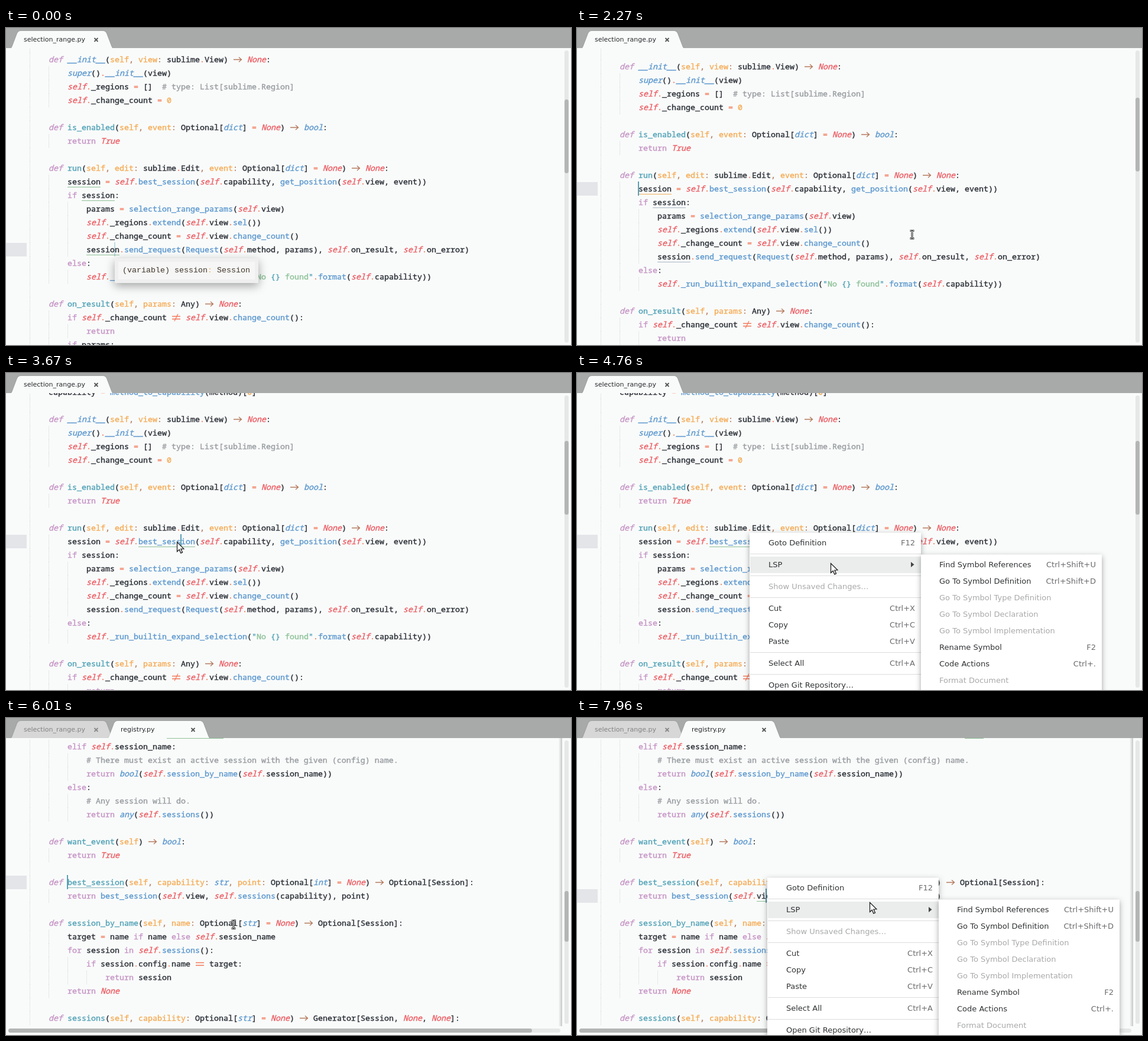
These frames come from a looping animation (956 by 537 pixels, 8000 ms). An HTML page with a canvas:

```html
<!DOCTYPE html>
<html lang="en">
<head>
<meta charset="utf-8">
<title>Go to definition</title>
<style>
html, body { margin: 0; width: 100%; height: 100%; overflow: hidden; background: #f9fbfa; }
canvas { display: block; }
</style>
</head>
<body>
<canvas id="stage" width="956" height="537"></canvas>
<script>
const g = document.getElementById('stage').getContext('2d');
const LOOP = 8000, LINE = 23, COL = 8, LEFT = 40;
const MONO = '13.333px "Noto Sans Mono", "DejaVu Sans Mono", monospace';
const SANS = '"DejaVu Sans", sans-serif';
const C = {
  bg: '#f9fbfa', text: '#2d3138', purple: '#c695c6', red: '#ec5f66', blue: '#5f99cf', teal: '#54a3b8',
  green: '#8fc29a', orange: '#f5ac58', op: '#f4775a', comment: '#999da1', arrow: '#b57a5e', caret: '#5a9fb4',
  mark: '#8fc097'
};

const rangeFile = `    capability = method_to_capability(method)[0]

    def __init__(self, view: sublime.View) -> None:
        super().__init__(view)
        self._regions = []  # type: List[sublime.Region]
        self._change_count = 0

    def is_enabled(self, event: Optional[dict] = None) -> bool:
        return True

    def run(self, edit: sublime.Edit, event: Optional[dict] = None) -> None:
        session = self.best_session(self.capability, get_position(self.view, event))
        if session:
            params = selection_range_params(self.view)
            self._regions.extend(self.view.sel())
            self._change_count = self.view.change_count()
            session.send_request(Request(self.method, params), self.on_result, self.on_error)
        else:
            self._run_builtin_expand_selection("No {} found".format(self.capability))

    def on_result(self, params: Any) -> None:
        if self._change_count != self.view.change_count():
            return
        if params:`.split('\n');

const registryFile = `        elif self.session_name:
            # There must exist an active session with the given (config) name.
            return bool(self.session_by_name(self.session_name))
        else:
            # Any session will do.
            return any(self.sessions())

    def want_event(self) -> bool:
        return True

    def best_session(self, capability: str, point: Optional[int] = None) -> Optional[Session]:
        return best_session(self.view, self.sessions(capability), point)

    def session_by_name(self, name: Optional[str] = None) -> Optional[Session]:
        target = name if name else self.session_name
        for session in self.sessions():
            if session.config.name == target:
                return session
        return None

    def sessions(self, capability: Optional[str] = None) -> Generator[Session, None, None]:`.split('\n');

// y, label, shortcut, disabled
const mainItems = [
  [287, 'Goto Definition', 'F12'], [324, 'LSP', ''], [361, 'Show Unsaved Changes…', '', 1],
  [398, 'Cut', 'Ctrl+X'], [426, 'Copy', 'Ctrl+C'], [454, 'Paste', 'Ctrl+V'],
  [491, 'Select All', 'Ctrl+A'], [528, 'Open Git Repository…', '']
];
const subItems = [
  ['Find Symbol References', 'Ctrl+Shift+U'], ['Go To Symbol Definition', 'Ctrl+Shift+D'],
  ['Go To Symbol Type Definition', '', 1], ['Go To Symbol Declaration', '', 1],
  ['Go To Symbol Implementation', '', 1], ['Rename Symbol', 'F2'],
  ['Code Actions', 'Ctrl+.'], ['Format Document', '', 1]
].map((item, i) => [324 + 28 * i, ...item]);

const ramp = (t, a, b) => Math.max(0, Math.min(1, (t - a) / (b - a)));
const ease = p => p * p * (3 - 2 * p);

function rect(x, y, w, h, color, r = 0) {
  g.fillStyle = color;
  g.beginPath();
  g.roundRect(x, y, w, h, r);
  g.fill();
}

function text(s, x, y, color, font, align = 'left') {
  g.font = font;
  g.fillStyle = color;
  g.textAlign = align;
  g.fillText(s, x, y);
}

// Code glyphs get a thin outline for a medium weight
function codeText(s, x, y, color, italic) {
  text(s, x, y, color, (italic ? 'italic ' : '') + MONO);
  g.strokeStyle = color;
  g.lineWidth = .4;
  g.strokeText(s, x, y);
}

function lines(color, width, ...paths) {
  g.strokeStyle = color;
  g.lineWidth = width;
  g.beginPath();
  for (const p of paths) p.forEach(([x, y], i) => i ? g.lineTo(x, y) : g.moveTo(x, y));
  g.stroke();
}

// Returns [colour, italic] for one token
function style(tok, line, at) {
  const arrow = line.indexOf('->');
  const isDef = /^\s*def /.test(line);
  const inParams = isDef && at < (arrow < 0 ? line.length : arrow);
  const next = line[at + tok.length];
  if (tok[0] === '#') return [C.comment];
  if (tok === 'def') return [C.purple, 1];
  if (/^(if|elif|else|return|for|in)$/.test(tok)) return [C.purple];
  if (tok === 'self') return inParams ? [C.orange] : [C.red, 1];
  if (/^(None|True)$/.test(tok)) return [C.red, 1];
  if (/^(dict|bool|str|int|any|super|__init__)$/.test(tok)) return [C.blue, 1];
  if (/^\d/.test(tok)) return [C.orange];
  if (/^\w/.test(tok)) {
    if (next === '(') return [isDef ? C.teal : C.blue];
    return [inParams && next === ':' ? C.orange : C.text];
  }
  if (tok === '=' || tok === '.') return [C.op];
  if (inParams && /[,:]/.test(tok)) return [C.arrow];
  return [C.text];
}

function ligature(tok, x, y) {
  if (tok === '->') lines(C.arrow, 1.3, [[x + 1, y], [x + 15, y]], [[x + 10, y - 4], [x + 14.5, y], [x + 10, y + 4]]);
  else {
    lines(C.op, 1.3, [[x + 1, y - 2], [x + 15, y - 2]], [[x + 1, y + 2.5], [x + 15, y + 2.5]]);
    if (tok === '!=') lines(C.op, 1.3, [[x + 5, y + 6], [x + 11, y - 6]]);
  }
}

function codeLine(line, y) {
  for (const m of line.matchAll(/#.*|"[^"]*"|->|!=|==|\w+|\s+|./g)) {
    const tok = m[0];
    let x = LEFT + m.index * COL;
    if (/^\s/.test(tok)) continue;
    if (/^(->|!=|==)$/.test(tok)) ligature(tok, x, y + .5);
    else if (tok[0] === '"') {
      for (const part of tok.split(/("|{})/)) {
        codeText(part, x, y + 5, /["{]/.test(part) ? C.teal : C.green);
        x += part.length * COL;
      }
    } else codeText(tok, x, y + 5, ...style(tok, line, m.index));
  }
}

function code(file, top) {
  file.forEach((line, i) => {
    const y = top + i * LINE;
    if (y > 560) return;
    const indent = line.search(/\S/);
    g.setLineDash([1, 1]);
    for (let c = 0; c < Math.max(indent, 1); c += 4)
      lines('#d3d7d6', 1, [[LEFT + c * COL + .5, y - 11], [LEFT + c * COL + .5, y + 12]]);
    g.setLineDash([]);
    codeLine(line, y);
  });
}

const underline = (x, y, chars, color) => rect(x, y + 9, chars * COL, 1, color);
const gutter = y => rect(0, y - 11, 35, LINE, '#e3e5e9');

function caret(x, y, alpha = 1) {
  g.globalAlpha = alpha;
  rect(x - 1, y - 12, 2, 24, C.caret);
  g.globalAlpha = 1;
}

function tab(x, label, active) {
  g.save();
  g.shadowColor = 'rgba(0,0,0,.15)';
  g.shadowBlur = 2;
  g.fillStyle = active ? C.bg : '#d6d7d6';
  g.beginPath();
  g.moveTo(x, 35);
  g.quadraticCurveTo(x + 2, 33, x + 3, 30);
  g.lineTo(x + 11, 9);
  g.quadraticCurveTo(x + 13, 5, x + 17, 5);
  g.lineTo(x + 156, 5);
  g.quadraticCurveTo(x + 160, 5, x + 162, 9);
  g.lineTo(x + 170, 30);
  g.quadraticCurveTo(x + 171, 33, x + 173, 35);
  g.fill();
  g.restore();
  text(label, x + 22, 23, active ? '#26292c' : '#858083', '11px ' + SANS);
  const cx = x + 144.5, r = 3;
  lines(active ? '#555' : '#888', 1.8, [[cx - r, 20 - r], [cx + r, 20 + r]], [[cx + r, 20 - r], [cx - r, 20 + r]]);
}

function panel(x, y, w, h) {
  g.save();
  g.shadowColor = 'rgba(0,0,0,.35)';
  g.shadowBlur = 9;
  g.shadowOffsetY = 2;
  rect(x, y, w, h, '#fff');
  g.restore();
}

function items(list, x, right) {
  for (const [y, label, keys, off] of list) {
    text(label, x, y + 5, off ? '#a8a9a9' : '#303234', '13px ' + SANS);
    text(keys, right, y + 5, '#6c6a6e', '13px ' + SANS, 'right');
  }
}

function menu(x, alpha, hover, subAlpha, subHover) {
  if (!alpha) return;
  g.globalAlpha = alpha;
  panel(x, 270.5, 290, 300);
  if (hover) rect(x + 1, hover - 13, 289, 28, '#ebecec');
  for (const y of [306, 343, 380, 473, 510]) rect(x + 1, y, 289, 1, '#dcdddd');
  items(mainItems, x + 32, x + 280);
  g.fillStyle = '#444';
  g.beginPath();
  g.moveTo(x + 273, 320);
  g.lineTo(x + 278.5, 324.5);
  g.lineTo(x + 273, 329);
  g.fill();
  g.globalAlpha = subAlpha;
  if (subAlpha) {
    panel(x + 290, 307.5, 306, 300);
    if (subHover) rect(x + 291, subHover - 13, 305, 28, '#ebecec');
    items(subItems, x + 321, x + 586);
  }
  g.globalAlpha = 1;
}

function hoverPopup() {
  g.save();
  g.shadowColor = 'rgba(0,0,0,.35)';
  g.shadowBlur = 16;
  g.shadowOffsetY = 5;
  rect(184, 390, 243, 42, '#eeefee');
  g.restore();
  rect(190, 396, 231, 30, '#f5f6f5');
  const font = '13.333px "Liberation Mono", monospace';
  text('(variable) session', 197, 414, '#40342a', font);
  text(':', 341, 414, C.orange, font);
  text('Session', 357, 414, '#40342a', font);
}

function pointer(x, y) {
  g.beginPath();
  [[0, 0], [0, 16], [3.7, 12.6], [6.3, 18.6], [9, 17.4], [6.4, 11.6], [11.3, 11.3]]
    .forEach(([dx, dy]) => g.lineTo(x + dx + .5, y + dy + .5));
  g.closePath();
  g.fillStyle = '#fff';
  g.fill();
  g.strokeStyle = '#1c1c1c';
  g.lineWidth = 1.3;
  g.stroke();
}

function beam(x, y) {
  const shape = [
    [[x - 3.5, y - 6.5], [x - 1, y - 6.5], [x, y - 5.5], [x + 1, y - 6.5], [x + 3.5, y - 6.5]],
    [[x, y - 5.5], [x, y + 5.5]],
    [[x - 3.5, y + 6.5], [x - 1, y + 6.5], [x, y + 5.5], [x + 1, y + 6.5], [x + 3.5, y + 6.5]]
  ];
  lines('#222', 3, ...shape);
  lines('#fff', 1, ...shape);
}

// time, x, y
const mousePath = [
  [2170, 567, 350], [2670, 567, 350], [3280, 291, 287], [3710, 289, 286], [4060, 345, 310], [4220, 345, 310],
  [4480, 429, 322], [4760, 429, 322], [5000, 606, 331], [5170, 606, 331], [5290, 640, 348],
  [5640, 640, 350], [6010, 385, 350], [6060, 385, 350], [6290, 345, 319], [6330, 345, 319],
  [6700, 321, 303], [7330, 321, 303], [7900, 495, 312], [8000, 495, 312]
];

function mouse(t) {
  if (t < 2170) return;
  const i = mousePath.findIndex(k => k[0] > t);
  const [t0, x0, y0] = mousePath[i - 1], [t1, x1, y1] = mousePath[i];
  const p = ease(ramp(t, t0, t1));
  const x = x0 + (x1 - x0) * p, y = y0 + (y1 - y0) * p;
  const overMenu = t >= 3440 && t < 5560 || t >= 7170;
  (overMenu ? pointer : beam)(x, y);
}

function rangeView(t) {
  const scroll = Math.round(25 * (1 - (1 - ramp(t, 2210, 2440)) ** 2));
  const top = 7 + scroll, row = n => top + n * LINE;
  const jumped = t >= 2210;
  gutter(row(jumped ? 11 : 16));
  code(rangeFile, top);
  if (t < 3260) {
    const rest = jumped ? '#aab6c4' : C.mark;
    underline(104, row(11), 7, jumped ? '#efae5c' : C.mark);
    underline(128, row(12), 7, rest);
    underline(136, row(16), 7, rest);
  } else if (t >= 3440) underline(224, row(11), 12, C.mark);
  if (!jumped) caret(184, row(16), t < 50 ? .35 : ramp(t, 1020, 1120));
  else if (t < 3260) caret(104, row(11), 1 - ramp(t, 2670, 2760) + ramp(t, 3080, 3160));
  else if (t >= 3440) caret(296, row(11));
  rect(945, 38, 7, 495, '#e6e8e7', 3.5);
  rect(945, 121 - scroll * .24, 7, 125, '#b4b6b5', 3.5);
}

function registryView(t) {
  const clicked = t >= 6720, row = n => 48 + n * LINE;
  g.save();
  g.beginPath();
  g.rect(0, 30, 940, 492);
  g.clip();
  gutter(row(clicked ? 11 : 10));
  code(registryFile, 48);
  if (clicked) {
    underline(256, row(11), 1, C.teal);
    underline(608, row(11), 1, C.teal);
    if (t >= 6950) {
      underline(656, row(-1), 4, C.mark);
      underline(304, row(11), 4, C.mark);
    }
    caret(320, row(11));
  } else {
    underline(272, row(-1), 12, C.mark);
    underline(104, row(10), 12, '#8fb9c0');
    caret(104, row(10), 1 - ramp(t, 6330, 6430));
  }
  g.restore();
  const shade = g.createLinearGradient(935, 0, 941, 0);
  shade.addColorStop(0, 'rgba(160,165,163,0)');
  shade.addColorStop(1, 'rgba(160,165,163,.6)');
  rect(935, 34, 6, 488, shade);
  rect(945, 38, 7, 480, '#e6e8e7', 3.5);
  rect(945, 293, 7, 86, '#b4b6b5', 3.5);
  rect(4, 526, 934, 7, '#e6e8e7', 3.5);
  rect(4, 526, 886, 7, '#b4b6b5', 3.5);
}

function draw(t) {
  const opened = t >= 5560;
  rect(0, 0, 956, 537, C.bg);
  (opened ? registryView : rangeView)(t);

  rect(0, 0, 956, 34, '#a8aaa9');
  g.save();
  g.beginPath();
  g.rect(0, 0, 956, 34);
  g.clip();
  tab(8, 'selection_range.py', !opened);
  if (opened) {
    g.globalAlpha = ramp(t, 5520, 5680);
    tab(172, 'registry.py', true);
  }
  g.restore();

  if (t < 340) hoverPopup();
  else if (t < 2170)
    menu(185, ramp(t, 300, 490), t >= 1060 ? 324 : 0, ramp(t, 1300, 1480), t >= 1960 ? 352 : t >= 1850 ? 324 : 0);
  else if (t >= 3710 && t < 5520)
    menu(292, ramp(t, 3690, 3860), t >= 4220 ? 324 : t >= 3800 ? 287 : 0,
      ramp(t, 4320, 4480), t >= 5210 ? 352 : t >= 4920 ? 324 : 0);
  else if (t >= 7170)
    menu(322, ramp(t, 7140, 7320), t >= 7580 ? 324 : t >= 7400 ? 287 : 0, ramp(t, 7760, 7920), 0);
  mouse(t);
}

function tick(now) {
  draw(now % LOOP);
  requestAnimationFrame(tick);
}
requestAnimationFrame(tick);
</script>
</body>
</html>
```
